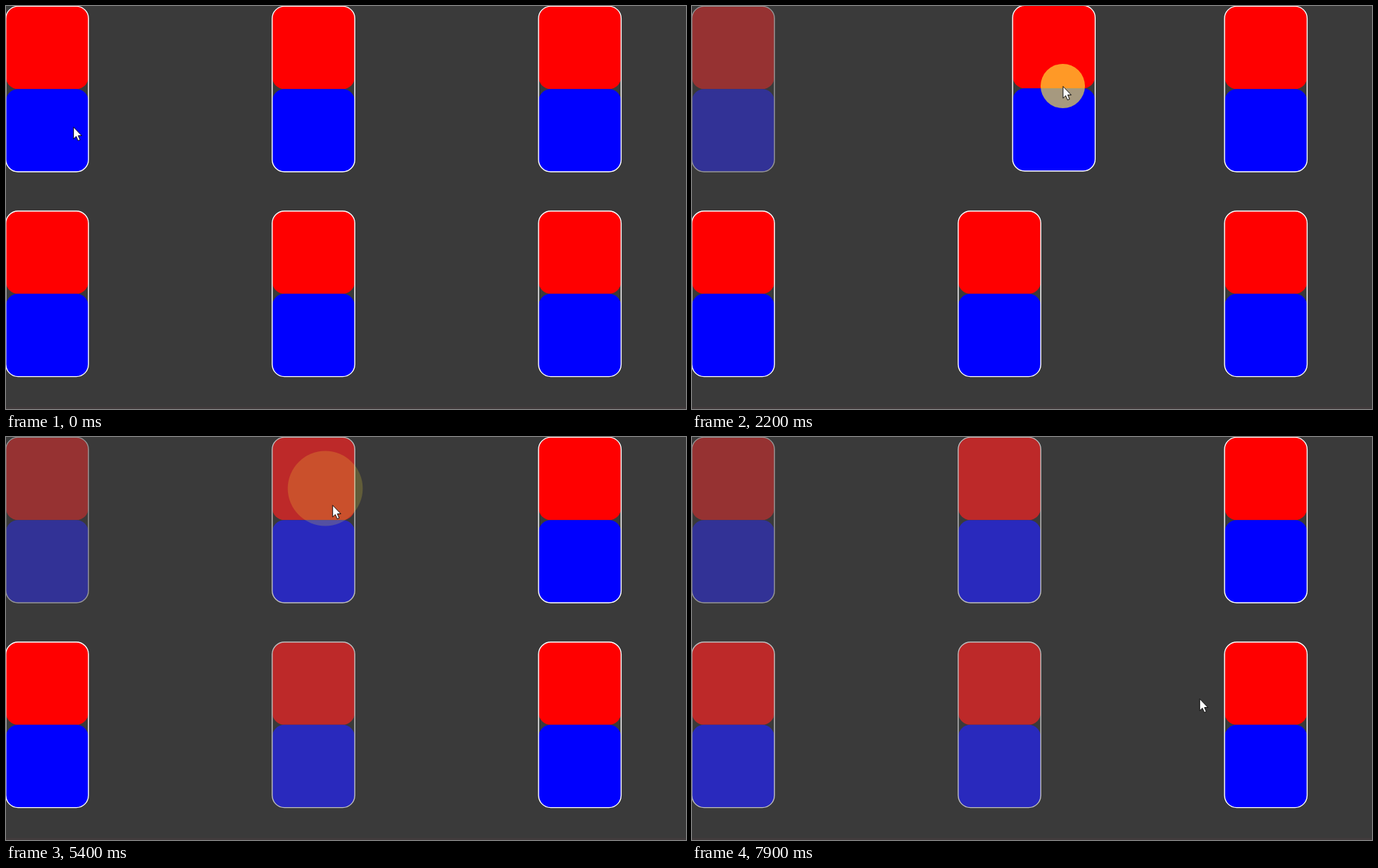
These frames come from a looping animation (950 px wide and 564 px high, 8 s). An HTML page:

```html
<!DOCTYPE html>
<html lang="en">
<head>
<meta charset="utf-8">
<title>Card dragging</title>
<style>
html, body { margin: 0; width: 100%; height: 100%; overflow: hidden; background: #3a3a3a; }
svg { display: block; width: 950px; height: 564px; }
</style>
</head>
<body>
<svg viewBox="0 0 950 564">
  <rect width="950" height="564" fill="#3a3a3a"/>
  <rect y="561" width="950" height="3" fill="#413b3c"/>
  <g id="cards"></g>
  <circle id="dot" fill="#ffeb3b"/>
  <path id="arrow" d="M0 0V16.5L3.8 13L6.4 19L9.2 17.8L6.6 12H11.5Z" fill="#fff" stroke="#000" stroke-width="0.9"/>
</svg>
<script>
const LOOP = 8000, STEP = 100, LAG = 100, RIPPLE = 200, RADIUS = 31, ALPHA = 0.65;
const SIDE = 115.8, WIDTH = 115.4;

// strong and weak channel of a card after 0, 1 and 2 hits
const shades = [[255, 0], [189, 41], [150, 50]];

// pointer stops: time, x, y, rest
const stops = [
  [0, 94, 169, 500], [900, 442, 113, 100], [1200, 597, 156], [1300, 575, 150],
  [2100, 518, 112, 200], [2900, 455, 118, 100], [3300, 458, 352, 100],
  [3600, 500, 370], [3900, 604, 300, 200], [4200, 587, 320], [4900, 446, 72, 300],
  [5400, 456, 95], [5900, 72, 347, 100], [6200, 140, 380], [6400, 288, 282],
  [6500, 288, 262], [7100, 80, 112, 200], [7800, 476, 393], [7900, 709, 366]
];

// each drop dims the cards it hits, once per mention
const drags = [
  { card: 0, press: 60, drop: 110, hits: [0, 0] },
  { card: 1, press: 1000, drop: 3000, hits: [] },
  { card: 4, press: 3400, drop: 5262, hits: [1, 4] },
  { card: 3, press: 6000, drop: 7300, hits: [3] }
];

const byId = id => document.getElementById(id);
const layer = byId("cards"), dot = byId("dot"), arrow = byId("arrow");

function add(parent, tag, attrs = {}) {
  const node = document.createElementNS("http://www.w3.org/2000/svg", tag);
  parent.appendChild(node);
  return set(node, attrs);
}

function set(node, attrs) {
  for (const name in attrs) node.setAttribute(name, attrs[name]);
  return node;
}

const move = (node, x, y) => set(node, { transform: `translate(${x} ${y})` });

function makeCard(_, i) {
  const node = add(layer, "g");
  const box = { width: WIDTH, height: SIDE, rx: 17 };
  return {
    node,
    x: -0.2 + (i % 3) * 372.1,
    y: 0.4 + Math.floor(i / 3) * 286.6,
    top: add(node, "rect", box),
    bottom: add(node, "rect", { ...box, y: SIDE }),
    rim: add(node, "rect", { ...box, height: 2 * SIDE, fill: "none", "stroke-width": 1.4 })
  };
}

const cards = Array.from({ length: 6 }, makeCard);

function paint(card, hits) {
  const [hi, lo] = shades[hits];
  set(card.top, { fill: `rgb(${hi},${lo},${lo})` });
  set(card.bottom, { fill: `rgb(${lo},${lo},${hi})` });
  set(card.rim, { stroke: `rgb(${hi},${hi},${hi})` });
}

function pointer(t) {
  const i = Math.max(0, stops.findLastIndex(s => s[0] <= t));
  const [at, x, y, rest = 0] = stops[i];
  const [end, nx, ny] = stops[i + 1] || stops[i];
  const go = at + rest;
  const k = t > go && end > go ? (t - go) / (end - go) : 0;
  return [x + (nx - x) * k, y + (ny - y) * k];
}

const touch = t => pointer(t - LAG);

function drawDot(drag, t) {
  dot.style.display = drag ? "" : "none";
  if (!drag) return;
  const k = Math.max(0, (t - drag.drop) / RIPPLE);
  const [cx, cy] = touch(Math.min(t, drag.drop));
  set(dot, { cx, cy, r: RADIUS * (1 + k), opacity: ALPHA * (1 - k) });
}

function draw(t) {
  const held = drags.find(d => t >= d.press && t < d.drop);
  const hits = drags.filter(d => t >= d.drop).flatMap(d => d.hits);
  cards.forEach((card, i) => {
    let { x, y } = card;
    if (held && held.card === i) {
      const from = touch(held.press), to = touch(t);
      x += to[0] - from[0];
      y += to[1] - from[1];
      if (layer.lastChild !== card.node) layer.appendChild(card.node);
    }
    paint(card, hits.filter(h => h === i).length);
    move(card.node, x, y);
  });
  drawDot(drags.find(d => t >= d.press && t < d.drop + RIPPLE), t);
  const [x, y] = pointer(t);
  move(arrow, x + 0.3, y + 0.5);
}

const start = performance.now();
function tick() {
  const t = (performance.now() - start) % LOOP;
  draw(Math.floor(t / STEP) * STEP);
  requestAnimationFrame(tick);
}
tick();
</script>
</body>
</html>
```
